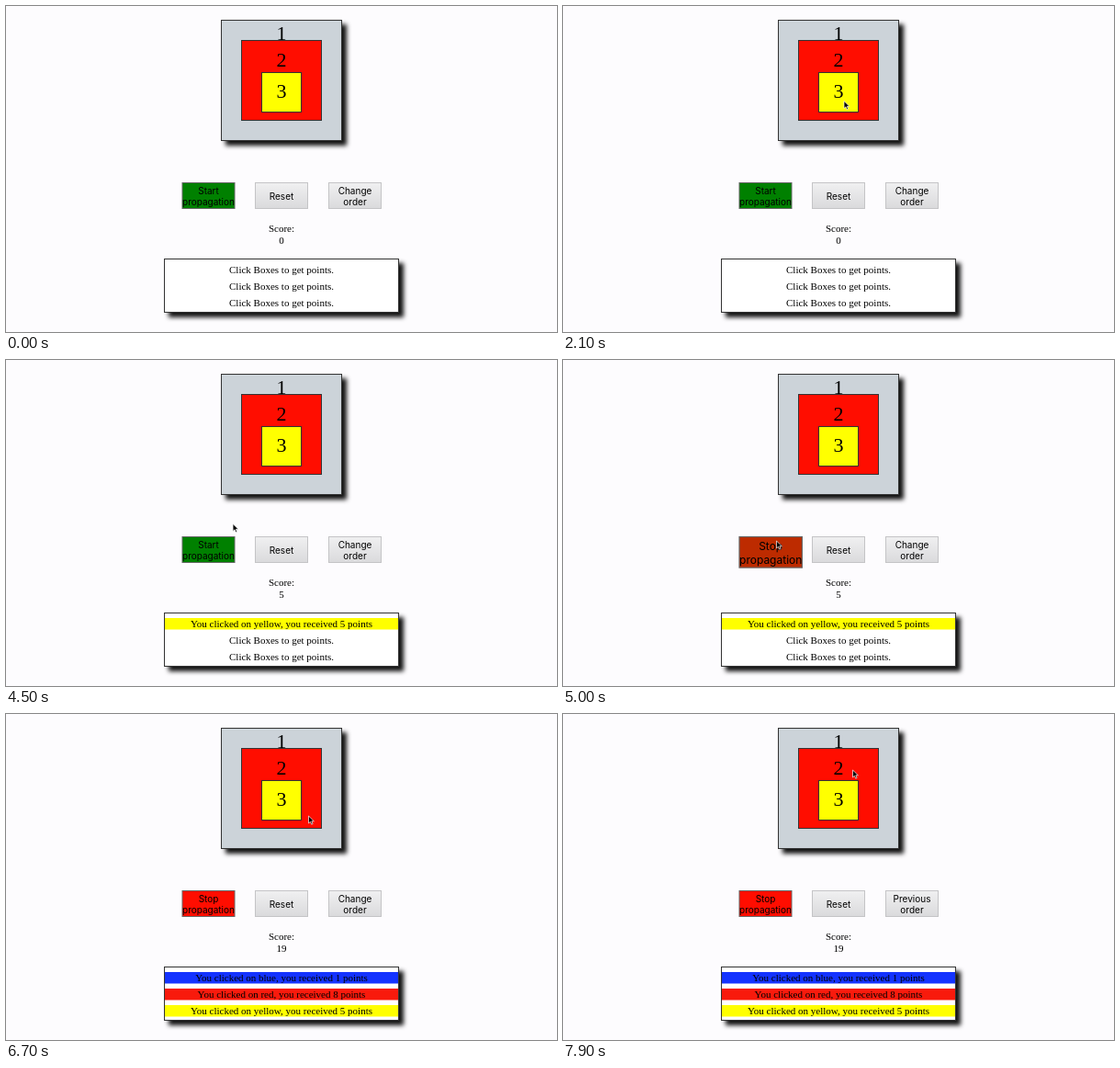
Animation, 600 px wide and 355 px high, one loop 8 s. Source, as an HTML page:

```html
<!DOCTYPE html>
<html lang="en">
<head>
<meta charset="utf-8">
<title>Event propagation</title>
<style>
  html, body { margin: 0; height: 100%; overflow: hidden; background: #fdfcfe; }
  svg { display: block; }
  text { font: 11px "Liberation Serif", serif; text-anchor: middle; }
  .digit { font-size: 22px; }
  .button text { font: 10px Inter, sans-serif; }
  .button rect { fill: url(#grey); stroke: #c4c4c6; }
  .button { transform-box: fill-box; }
  #toggle rect { stroke: #666; }
  .box { stroke: #333; }
  .raised { filter: drop-shadow(5px 5px 2.5px #111); }
</style>
</head>
<body>
<svg width="600" height="355">
  <defs>
    <linearGradient id="grey" x2="0" y2="1">
      <stop stop-color="#f0f0f1"/><stop offset="1" stop-color="#dadadc"/>
    </linearGradient>
  </defs>

  <rect class="box raised" x="234.5" y="15.5" width="131" height="131" fill="#ccd3d9"/>
  <rect class="box" x="256.5" y="37.5" width="87" height="87" fill="#ff0d00"/>
  <rect class="box" x="278.5" y="72.5" width="43" height="43" fill="#ff0"/>
  <text class="digit" x="300" y="36.5">1</text>
  <text class="digit" x="300" y="65.5">2</text>
  <text class="digit" x="300" y="100">3</text>

  <text x="300" y="246">Score:</text>
  <text x="300" y="258.5" id="score"></text>
  <rect class="box raised" x="172.5" y="275.5" width="255" height="58" fill="#fff"/>
  <g id="rows"></g>

  <g class="button" id="toggle">
    <rect x="-28.5" y="-14.5" width="57" height="28"/>
    <text y="-2.5"></text><text y="10">propagation</text>
  </g>
  <g class="button" transform="translate(300 207)">
    <rect x="-28.5" y="-14.5" width="57" height="28"/>
    <text y="3.5">Reset</text>
  </g>
  <g class="button" id="order">
    <rect x="-28.5" y="-14.5" width="57" height="28"/>
    <text y="-2.5"></text><text y="10">order</text>
  </g>

  <path id="pointer" d="M0 0V8L1.9 6.3 3.2 9.2 4.6 8.6 3.3 5.8H5.9Z"
        fill="#000" stroke="#fff" stroke-width=".7"/>
</svg>
<script>
const LOOP = 8000, STEP = 100;
const FIRST_CLICK = 3000, TOGGLE_CLICK = 4800, SECOND_CLICK = 6100, ORDER_CLICK = 7400;

// Pointer stops: time, x, y
const PATH = [
  [0, 348, 320], [600, 312, 62], [800, 312, 62], [1000, 300, 54], [1200, 303, 98],
  [2000, 303, 98], [2100, 306, 103.5], [4000, 306, 103.5], [4700, 232.5, 197],
  [5000, 232.5, 197], [5450, 335, 125], [5700, 310.5, 102], [6600, 310.5, 102],
  [6700, 329.5, 111], [7250, 380, 199], [7500, 380, 199], [7900, 315.5, 61], [8000, 315.5, 61]
];
const BEFORE = "Click Boxes to get points.";
const AWARDS = [["blue", 1, "#1433ff"], ["red", 8, "#f81a0c"], ["yellow", 5, "#ff0"]];

const $ = selector => document.querySelector(selector);
const smooth = (t, start, end) => {
  const p = Math.min(1, Math.max(0, (t - start) / (end - start)));
  return p * p * (3 - 2 * p);
};
const setText = (node, value) => { if (node.textContent !== value) node.textContent = value; };

$("#rows").innerHTML = AWARDS.map((_, i) =>
  `<rect x="173" y="${281 + 18 * i}" width="254" height="12.5"/>
   <text x="300" y="${291 + 18 * i}"></text>`).join("");
const bands = document.querySelectorAll("#rows rect");
const lines = document.querySelectorAll("#rows text");

function movePointer(t) {
  const next = PATH.findIndex(stop => stop[0] > t);
  const [t0, x0, y0] = PATH[next - 1], [t1, x1, y1] = PATH[next];
  const p = smooth(t, t0, t1);
  const pointer = $("#pointer");
  pointer.setAttribute("transform", `translate(${x0 + (x1 - x0) * p} ${y0 + (y1 - y0) * p})`);
  pointer.setAttribute("visibility", t < STEP ? "hidden" : "visible");
}

function drawButton(id, x, label, hover) {
  $(id).setAttribute("transform", `translate(${x} 207) scale(${1 + 0.2 * hover})`);
  setText($(id + " text"), label);
}

function drawRow(i, award, fade) {
  setText(lines[i], award ? `You clicked on ${award[0]}, you received ${award[1]} points` : BEFORE);
  bands[i].setAttribute("fill", award ? award[2] : "none");
  bands[i].setAttribute("opacity", fade);
}

function draw(t) {
  const first = t >= FIRST_CLICK, second = t >= SECOND_CLICK;
  setText($("#score"), second ? "19" : first ? "5" : "0");
  AWARDS.forEach((award, i) => {
    if (second) drawRow(i, award, smooth(t, SECOND_CLICK - 100, SECOND_CLICK + 200));
    else drawRow(i, first && i === 0 ? AWARDS[2] : null, smooth(t, FIRST_CLICK - 100, FIRST_CLICK + 300));
  });

  const red = smooth(t, TOGGLE_CLICK, TOGGLE_CLICK + 300);
  $("#toggle rect").style.fill = `rgb(${255 * red}, ${128 - 115 * red}, 0)`;
  drawButton("#toggle", 220.5, t < TOGGLE_CLICK ? "Start" : "Stop",
    smooth(t, 4500, 4800) - smooth(t, 5100, 5400));
  drawButton("#order", 380, t < ORDER_CLICK ? "Change" : "Previous",
    smooth(t, 7100, 7400) - smooth(t, 7500, 7800));
  movePointer(t);
}

function frame() {
  draw(Math.floor(performance.now() % LOOP / STEP) * STEP);
  requestAnimationFrame(frame);
}
frame();
</script>
</body>
</html>
```
